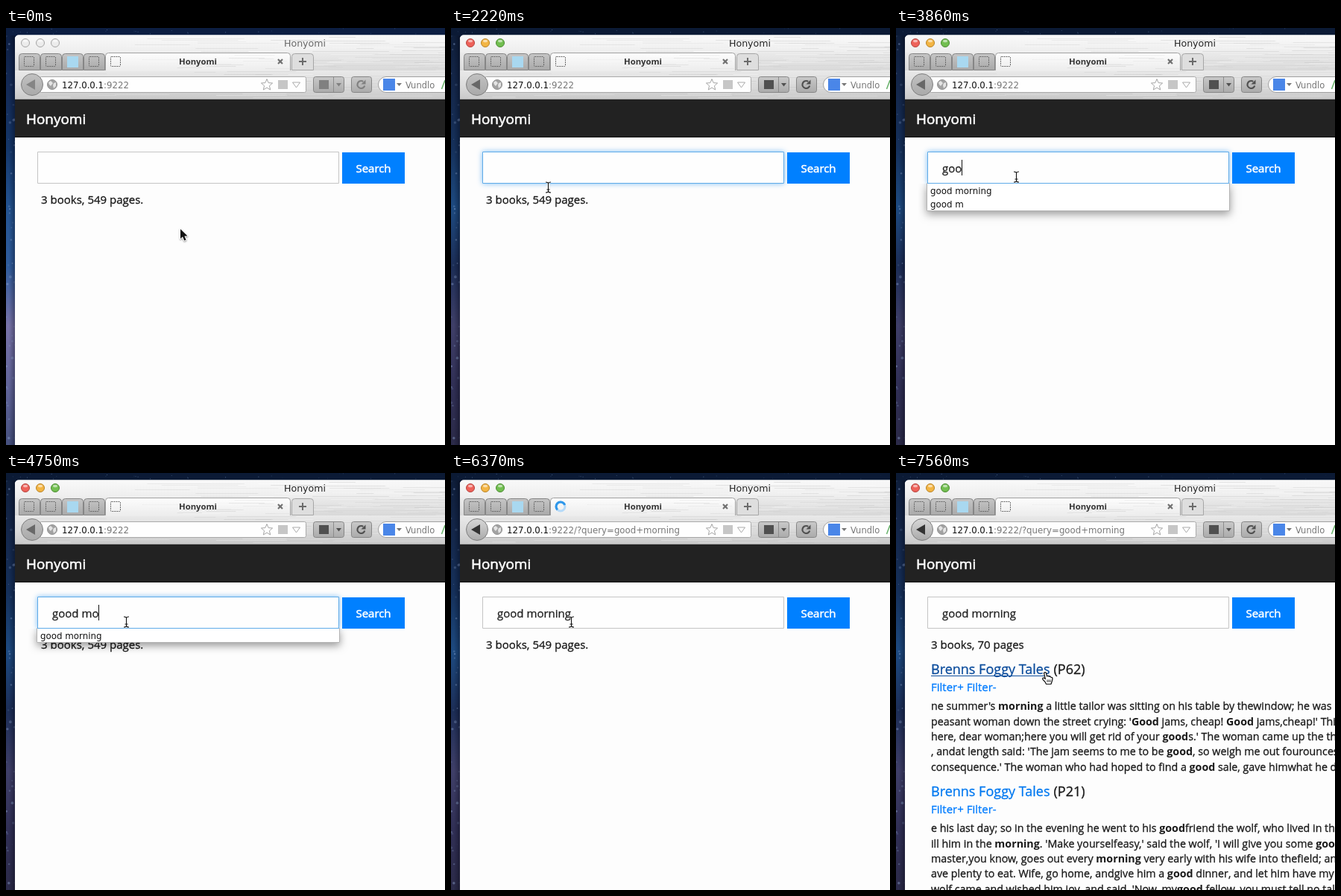
An HTML page with a canvas for the animation above (8 s loop, 589 by 560 pixels).

```html
<!DOCTYPE html>
<html lang="en">
<head>
<meta charset="utf-8">
<title>Honyomi</title>
<style>
html, body { margin: 0; width: 100%; height: 100%; overflow: hidden; background: #fdfdfd; }
canvas { display: block; }
</style>
</head>
<body>
<canvas id="stage" width="589" height="560"></canvas>
<script>
const W = 589, H = 560, LOOP = 8000;
const ctx = document.getElementById('stage').getContext('2d');
const PAGE = '"Open Sans", sans-serif';
const UI = '"DejaVu Sans", sans-serif';
const QUERY = 'good morning';
const BOOK = 'Brenns Foggy Tales';

// Stepped tracks: [time, ...values]
const CURSOR = [
  [0, arrow, 234, 270], [600, arrow, 120, 196], [750, arrow, 2, 124],
  [1050, arrow, 30, 146], [1200, arrow, 82, 174], [1350, arrow, 104, 184],
  [1770, beam, 106, 193], [2070, beam, 112, 199], [2220, beam, 130, 214],
  [2370, beam, 149, 225], [2510, beam, 160, 207], [2660, beam, 161, 200],
  [7260, arrow, 170, 222], [7410, hand, 192, 259], [7560, hand, 196, 267]
];
const TYPED = [[0, 0], [3560, 1], [3710, 2], [3860, 3], [4000, 4], [4150, 5], [4600, 6],
  [4750, 7], [5190, 8], [5340, 9], [5480, 10], [5630, 11], [5770, 12]];
const CARET = [[0, false], [1770, true], [2220, false], [2660, true], [3110, false], [3560, true], [6370, false]];
const GLOW = [[0, 0], [1770, 0.4], [2070, 1], [6370, 0]];
const MENU = [[0, 0], [3560, 6], [3710, 2], [4750, 1], [6220, 0]];
const WORDS = ['good morning', 'good m', 'goose', 'garden', 'giant', 'green'];

const RESULTS = [
  { page: 'P62', lines: [
    "ne summer's *morning* a little tailor was sitting on his table by thewindow; he was in",
    "peasant woman down the street crying: '*Good* jams, cheap! *Good* jams,cheap!' This",
    "here, dear woman;here you will get rid of your *good*s.' The woman came up the three",
    ", andat length said: 'The jam seems to me to be *good*, so weigh me out fourounces, dear",
    "consequence.' The woman who had hoped to find a *good* sale, gave himwhat he desired"] },
  { page: 'P21', lines: [
    "e his last day; so in the evening he went to his *good*friend the wolf, who lived in the",
    "ill him in the *morning*. 'Make yourselfeasy,' said the wolf, 'I will give you some *good*",
    "master,you know, goes out every *morning* very early with his wife into thefield; and",
    "ave plenty to eat. Wife, go home, andgive him a *good* dinner, and let him have my",
    "wolf came and wished him joy, and said, 'Now, my*good* fellow, you must tell no tales"] }
];

function at(track, t) {
  let hit = track[0];
  for (const key of track) if (key[0] <= t) hit = key;
  return hit.slice(1);
}

function seeded(n) {
  return () => (n = (n * 16807) % 2147483647) / 2147483647;
}

function rect(x, y, w, h, fill) {
  ctx.fillStyle = fill;
  ctx.fillRect(x, y, w, h);
}

function frame(x, y, w, h, color) {
  ctx.strokeStyle = color;
  ctx.lineWidth = 1;
  ctx.strokeRect(x + 0.5, y + 0.5, w - 1, h - 1);
}

function vertical(y0, y1, ...colors) {
  const g = ctx.createLinearGradient(0, y0, 0, y1);
  colors.forEach((c, i) => g.addColorStop(i / (colors.length - 1), c));
  return g;
}

function shape(fill, stroke, width = 1) {
  if (fill) { ctx.fillStyle = fill; ctx.fill(); }
  if (stroke) { ctx.strokeStyle = stroke; ctx.lineWidth = width; ctx.stroke(); }
}

function round(x, y, w, h, r, fill, stroke) {
  ctx.beginPath();
  ctx.roundRect(x, y, w, h, r);
  shape(fill, stroke);
}

function disc(x, y, r, fill, stroke) {
  ctx.beginPath();
  ctx.arc(x, y, r, 0, Math.PI * 2);
  shape(fill, stroke);
}

function poly(points, fill, stroke, width, open) {
  ctx.beginPath();
  for (let i = 0; i < points.length; i += 2) ctx.lineTo(points[i], points[i + 1]);
  if (!open) ctx.closePath();
  shape(fill, stroke, width);
}

// Draws text and returns the x where it ends.
function text(str, x, y, font, color, align = 'left') {
  ctx.font = font;
  ctx.fillStyle = color;
  ctx.textAlign = align;
  ctx.fillText(str, x, y);
  return x + ctx.measureText(str).width;
}

// Page copy is set a little heavier than the plain regular weight.
function copy(str, x, y, size, color, align, heft = 0.3) {
  const end = text(str, x, y, size + 'px ' + PAGE, color, align);
  ctx.strokeStyle = color;
  ctx.lineWidth = heft;
  ctx.lineJoin = 'round';
  ctx.strokeText(str, x, y);
  return end;
}

function desktop(active) {
  const sky = active
    ? ['#0e1d38', '#14274a', '#15305a', '#1d4a80', '#1c2d56', '#3f3f68', '#302f55', '#2b2a48']
    : ['#0c1d40', '#142a55', '#143668', '#235390', '#2f5c9c', '#7873a8', '#62659a', '#46517f'];
  rect(0, 0, W, H, vertical(0, H, ...sky));
  const rnd = seeded(91);
  for (let i = 0; i < 46; i++) {
    const s = 0.6 + rnd() * 1.3;
    disc(rnd() * 12, rnd() * H, s, `rgba(150,175,220,${0.1 + rnd() * 0.35})`);
  }
  rect(0, 0, W, 10, active ? '#0b1a35' : '#0c1e42');
  for (let i = 0; i < 30; i++) rect(rnd() * W, rnd() * 8, 1, 1, `rgba(130,160,210,${rnd() * 0.5})`);
  const shade = ctx.createLinearGradient(4, 0, 12, 0);
  shade.addColorStop(0, 'rgba(0,0,10,0)');
  shade.addColorStop(1, 'rgba(0,0,10,.35)');
  rect(4, 10, 8, H, shade);
}

function streaks(x, y, w, h, count, seed) {
  const rnd = seeded(seed);
  for (let i = 0; i < count; i++) {
    const len = 20 + rnd() * 120, sx = x + rnd() * w;
    const tone = rnd() < 0.5 ? '255,255,255' : '175,175,175';
    rect(sx, y + Math.floor(rnd() * h), Math.min(len, x + w - sx), 1, `rgba(${tone},${0.1 + rnd() * 0.2})`);
  }
}

function dashed(x, y) {
  ctx.setLineDash([2, 1]);
  round(x - 6.5, y - 6.5, 13, 13, 1, null, '#666');
  ctx.setLineDash([]);
}

function spinner(x, y, t) {
  const a = t / 1000 * Math.PI * 2;
  ctx.beginPath();
  ctx.arc(x, y, 6, 0, Math.PI * 2);
  shape(null, '#b5daf8', 3);
  ctx.beginPath();
  ctx.arc(x, y, 6, a, a + 3.6);
  shape(null, '#2f97ea', 3);
}

function tabs(t) {
  rect(12, 33, W, 24, vertical(33, 57, '#eaeaea', '#d9d9d9'));
  streaks(384, 33, 205, 24, 36, 17);
  for (let i = 0; i < 4; i++) {
    const x = 17 + i * 29;
    round(x + 0.5, 34.5, 28, 22, [4, 4, 0, 0], vertical(34, 57, '#c6c6c6', '#a8a8a8'), '#868686');
    if (i === 2) rect(x + 7, 38, 15, 15, '#a9d8f0');
    else dashed(x + 14, 45);
  }
  round(133.5, 33.5, 248, 25, [4, 4, 0, 0], vertical(33, 58, '#fdfdfd', '#ececec'), '#a0a0a0');
  streaks(160, 35, 220, 20, 18, 29);
  round(383.5, 34.5, 29, 22, [4, 4, 0, 0], '#dedede', '#a6a6a6');
  rect(393, 44, 10, 2, '#6b6b6b');
  rect(397, 40, 2, 10, '#6b6b6b');
  if (t >= 6220 && t < 6520) spinner(147, 45, t);
  else dashed(147, 45);
  text('Honyomi', 257.5, 49, 'bold 11.3px "Noto Sans", sans-serif', '#333', 'center');
  poly([365, 42, 371, 48], null, '#707070', 2.2, true);
  poly([371, 42, 365, 48], null, '#707070', 2.2, true);
}

function button(x, w) {
  round(x + 0.5, 65.5, w, 21, 3, vertical(65, 87, '#c9c9c9', '#aaa'), '#868686');
}

function star(x, y, r) {
  const pts = [];
  for (let i = 0; i < 10; i++) {
    const a = i * Math.PI / 5 - Math.PI / 2, k = i % 2 ? r * 0.45 : r;
    pts.push(x + Math.cos(a) * k, y + Math.sin(a) * k);
  }
  poly(pts, '#fff', '#a5a5a5');
}

function toolbar(t, active) {
  const icon = active ? '#505050' : '#808080';
  rect(12, 57, W, 39, vertical(57, 96, '#e9e9e9', '#dcdcdc', '#c9c9c9'));
  streaks(12, 58, 577, 37, 70, 53);
  rect(12, 95, W, 1, '#a3a3a3');
  rect(133, 57, 249, 1, '#ececec');

  const back = t >= 6370;
  round(45.5, 65.5, 357, 21, 2, '#fefefe', '#a9a9a9');
  disc(35, 76, 14.5, vertical(61, 91, back ? '#d8d8d8' : '#c2c2c2', '#a9a9a9'), '#7e7e7e');
  poly([27, 76, 39, 69, 39, 83], back ? '#333' : active ? '#686868' : '#858585');

  disc(62, 76, 6.5, '#a2a2a2', '#929292');
  poly([57, 73, 60, 71, 63, 74, 60, 78, 58, 76], '#e4e4e4');
  poly([64, 74, 67, 73, 67, 78, 64, 81, 63, 77], '#e4e4e4');
  const end = text('127.0.0.1', 75, 81, '11.75px ' + UI, '#111');
  text(':9222' + (back ? '/?query=good+morning' : ''), end, 81, '11.75px ' + UI, '#777');
  star(350, 76.5, 8);
  rect(365, 70, 13, 12, '#c6c6c6');
  poly([384.5, 73, 394.5, 73, 389.5, 80], '#fff', '#aaa');

  button(412, 41);
  rect(420, 70, 13, 12, icon);
  rect(439, 66, 1, 20, '#8c8c8c');
  poly([443, 74, 450, 74, 446.5, 78.5], icon);

  button(463, 27);
  ctx.beginPath();
  ctx.arc(476.5, 76, 5, 0.3, 5.3);
  shape(null, icon, 2.2);
  poly([482.5, 69.5, 482.5, 75.5, 476.5, 75.5], icon);

  round(499.5, 65.5, 120, 21, 10.5, '#fefefe', '#a0a0a0');
  rect(506, 68, 16, 16, '#4a86e8');
  poly([524, 74, 531, 74, 527.5, 78], '#777');
  text('Vundlo', 536, 81, '11.5px ' + UI, '#777');
  poly([584.5, 82, 589, 70], null, '#69b26b', 1.5, true);
}

function chrome(t, active) {
  round(12, 9.5, W, H, [5, 0, 0, 0], '#fdfdfd');
  round(12, 9.5, W, 24, [5, 0, 0, 0], vertical(10, 33, '#f9f9f9', '#ededed'));
  streaks(90, 12, 499, 21, 45, 7);
  const lights = active ? ['#ee625a', '#f3b544', '#72bf50'] : ['#ececec', '#ececec', '#ececec'];
  const rims = active ? ['#b5453f', '#b98428', '#4d8c36'] : ['#a6a6a6', '#a6a6a6', '#a6a6a6'];
  lights.forEach((c, i) => {
    const x = 26 + i * 20;
    disc(x, 20, 5.5, c, rims[i]);
    ctx.beginPath();
    ctx.ellipse(x, 17.5, 3, 1.8, 0, 0, Math.PI * 2);
    shape('rgba(255,255,255,.55)');
  });
  text('Honyomi', 401, 25, '12.6px ' + UI, active ? '#262626' : '#6a6a6a', 'center');
  tabs(t);
  toolbar(t, active);
}

function field(t) {
  const [glow] = at(GLOW, t), [n] = at(TYPED, t), [caret] = at(CARET, t);
  if (glow) {
    ctx.save();
    ctx.shadowColor = `rgba(80,165,240,${0.75 * glow})`;
    ctx.shadowBlur = 7;
    rect(42, 166, 405, 43, '#fefefe');
    ctx.restore();
  }
  rect(42, 166, 405, 43, '#fefefe');
  frame(42, 166, 405, 43, glow ? '#5fabe8' : '#c5c5c5');
  const end = copy(QUERY.slice(0, n), 62, 194, 15, '#222');
  if (caret) rect(Math.floor(end), 177, 1, 21, '#111');
  rect(451, 167, 84, 42, '#0080ff');
  copy('Search', 493, 194, 15, '#fff', 'center', 0.5);
}

function menu(t) {
  const [n] = at(MENU, t);
  if (!n) return;
  const h = n * 18 + 1;
  ctx.save();
  ctx.shadowColor = 'rgba(0,0,0,.4)';
  ctx.shadowBlur = 11;
  ctx.shadowOffsetY = 4;
  ctx.beginPath();
  ctx.rect(30, 209, 440, h + 30);
  ctx.clip();
  rect(41, 209, 407, h, '#fff');
  ctx.restore();
  frame(41, 208, 407, h + 1, '#b4b4b4');
  rect(42, 208, 405, 1, '#5fabe8');
  WORDS.slice(0, n).forEach((w, i) => text(w, 46, 223 + i * 18, '11.85px ' + UI, '#111'));
}

function snippet(line, y) {
  let x = 47;
  line.split('*').forEach((part, i) => {
    x = i % 2
      ? text(part, x, y, 'bold 14.25px ' + PAGE, '#1a1a1a')
      : copy(part, x, y, 14.25, '#1a1a1a');
  });
}

function results(hover) {
  RESULTS.forEach((r, i) => {
    const y = 270 + i * 164, hot = hover && i === 0;
    const color = hot ? '#0b4c9c' : '#0078f0';
    const end = copy(BOOK, 47, y, 18, color);
    if (hot) rect(47, y + 2, end - 47, 1, color);
    copy('(' + r.page + ')', 211.5, y, 18, '#1a1a1a');
    copy('Filter+ Filter-', 47, y + 23, 15, '#007cff');
    r.lines.forEach((line, k) => snippet(line, Math.round(y + 48.2 + k * 20.4)));
  });
}

function page(t) {
  rect(12, 96, W, 51, '#222');
  rect(12, 146, W, 1, '#111');
  copy('Honyomi', 27, 129, 18.9, '#fff', 'left', 0.6);
  const found = t >= 6520;
  copy(found ? '3 books, 70 pages' : '3 books, 549 pages.', 47, 236, 15, '#1a1a1a');
  field(t);
  menu(t);
  if (found) results(t >= 7410);
}

function arrow() {
  ctx.shadowColor = 'rgba(0,0,0,.35)';
  ctx.shadowBlur = 2;
  ctx.shadowOffsetY = 1;
  const pts = [0, 0, 0, 13, 3, 10.3, 5.3, 15.5, 7.6, 14.5, 5.4, 9.4, 9.5, 9.2];
  poly(pts, '#111', '#fff', 2);
  ctx.shadowColor = 'transparent';
  poly(pts, '#111');
}

function beam() {
  const line = () => {
    ctx.beginPath();
    ctx.moveTo(-3, -7);
    ctx.quadraticCurveTo(0.5, -7, 0.5, -5);
    ctx.quadraticCurveTo(0.5, -7, 4, -7);
    ctx.moveTo(0.5, -5);
    ctx.lineTo(0.5, 5);
    ctx.moveTo(-3, 7);
    ctx.quadraticCurveTo(0.5, 7, 0.5, 5);
    ctx.quadraticCurveTo(0.5, 7, 4, 7);
    ctx.moveTo(-1.5, 3);
    ctx.lineTo(2.5, 3);
  };
  line();
  shape(null, 'rgba(255,255,255,.8)', 2.6);
  line();
  shape(null, '#111', 1.1);
}

function hand() {
  ctx.lineJoin = 'round';
  poly([2.5, 1.5, 4, 0.5, 5.5, 1.5, 6.5, 6, 8, 5.3, 9.3, 6.4, 10.8, 6, 12, 7.3, 13.5, 7.5, 14, 9.5,
    13.2, 13, 12, 16.5, 5.5, 16.5, 4, 13.5, 0.8, 10.2, 0.8, 8.4, 2.5, 8, 4.4, 9.6], '#fff', '#111', 1.2);
  for (let x = 7; x < 12; x += 2) poly([x, 10.5, x, 14], null, '#222', 0.9, true);
}

function draw(t) {
  const active = t >= 1620;
  desktop(active);
  chrome(t, active);
  page(t);
  const [pointer, x, y] = at(CURSOR, t);
  ctx.save();
  ctx.translate(x, y);
  pointer();
  ctx.restore();
}

const start = performance.now();
function tick() {
  draw((performance.now() - start) % LOOP);
  requestAnimationFrame(tick);
}
tick();
</script>
</body>
</html>
```
